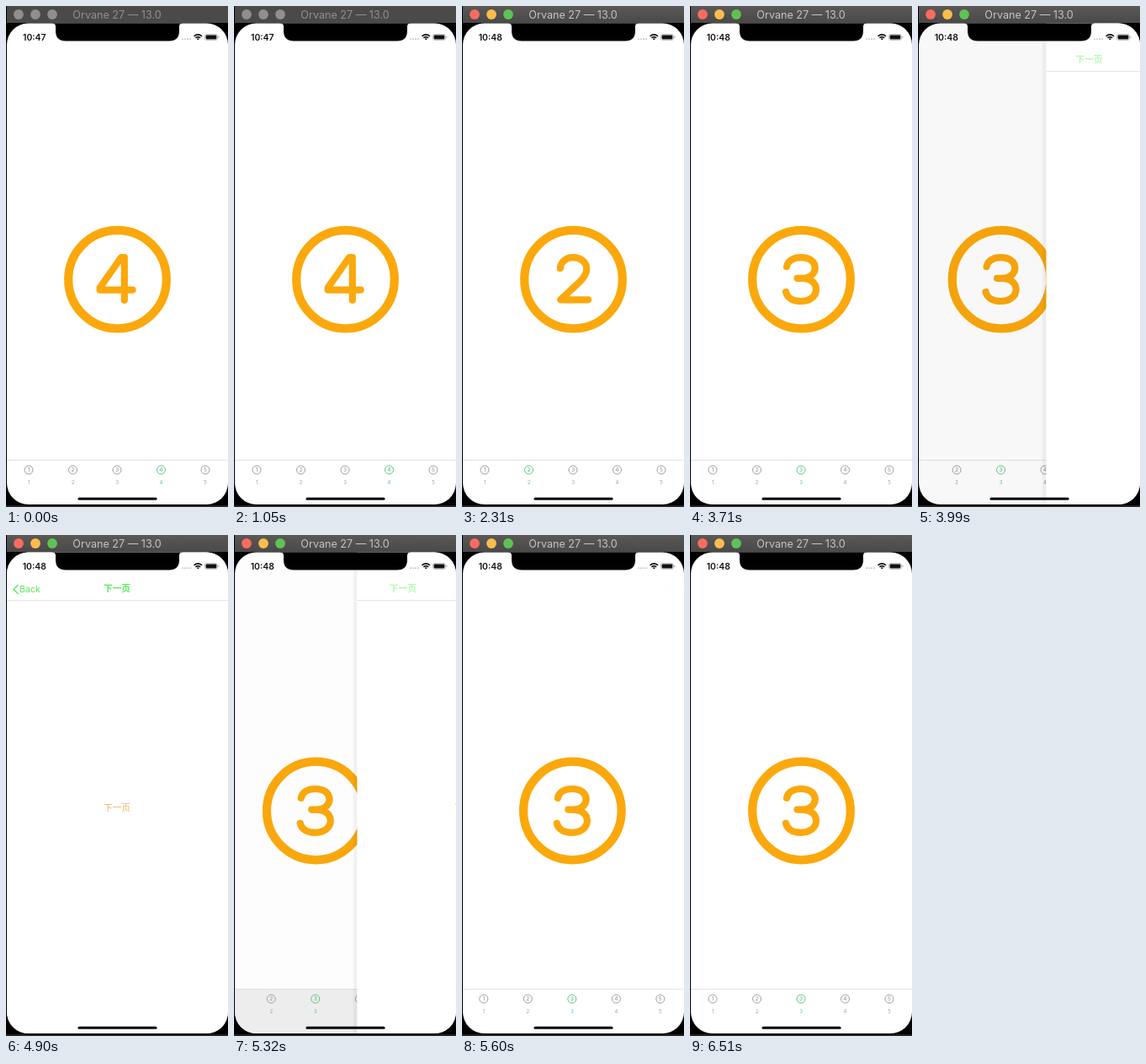
Animation of 264 by 594 pixels, one loop 6.58 s. Source, as an HTML page:

```html
<!DOCTYPE html>
<html lang="en">
<head>
<meta charset="utf-8">
<title>Tab demo</title>
<style>
html, body { margin: 0; width: 100%; height: 100%; overflow: hidden; background: #000; }
svg { display: block; width: 100vw; height: 100vh; }
text { font-family: Inter, Roboto, "Liberation Sans", sans-serif; }
.cjk { font-family: "Noto Sans CJK SC", "Noto Sans CJK", sans-serif; font-size: 10.7px; text-anchor: middle; }
.mid { text-anchor: middle; }
.line { fill: none; stroke-linecap: round; stroke-linejoin: round; }
</style>
</head>
<body>
<svg viewBox="0 0 264 594" preserveAspectRatio="none">
  <defs>
    <linearGradient id="barOn" x2="0" y2="1">
      <stop offset="0" stop-color="#5b5858"/><stop offset="1" stop-color="#4b4848"/>
    </linearGradient>
    <linearGradient id="shade">
      <stop offset="0" stop-color="#000" stop-opacity="0.03"/><stop offset="1" stop-color="#000" stop-opacity="0.06"/>
    </linearGradient>
    <clipPath id="screen"><rect x="1" y="20.5" width="263" height="570.5" rx="25.5"/></clipPath>
  </defs>

  <rect width="264" height="594" fill="#000"/>
  <rect y="592" width="264" height="2" fill="#252323"/>
  <rect id="bar" x="1" width="263" height="20"/>
  <g id="lights"></g>
  <text id="title" class="mid" x="132" y="14.8" font-size="12.6">Orvane 27 — 13.0</text>

  <g clip-path="url(#screen)">
    <rect y="20" width="264" height="572" fill="#fff"/>
    <g id="home">
      <g id="badge" class="line" stroke="#fba80c">
        <circle cx="132.5" cy="324.2" r="58.3" stroke-width="10.2"/>
        <path id="digit" stroke-width="8.2"/>
      </g>
      <rect id="tabBack" y="538" width="264" height="54" fill="#efefef"/>
      <rect y="538" width="264" height="1" fill="#e2e2e2"/>
      <g id="tabs"></g>
    </g>
    <rect id="dim" y="20" width="264" height="572" fill="#000"/>
    <g id="page">
      <rect id="edge" x="-5" y="42" width="5" height="550" fill="url(#shade)"/>
      <rect y="20" width="264" height="572" fill="#fff"/>
      <rect y="77" width="264" height="1" fill="#e4e4e4"/>
      <text class="cjk" x="132" y="327.4" fill="#f1b45c">下一页</text>
    </g>
    <g id="back" fill="#57e957">
      <path class="line" d="M14.2 59.5L8.9 64.5L14.2 69.5" stroke="#57e957" stroke-width="1.3"/>
      <text x="16" y="68.2" font-size="10.6">Back</text>
    </g>
    <text id="heading" class="cjk" x="132" y="67.2" font-weight="700" fill="#57f057">下一页</text>

    <path d="M55 20H210V20.5Q206 20.5 206 24.5V29.5Q206 41.4 194 41.4H71Q59 41.4 59 29.5V24.5Q59 20.5 55 20.5Z"/>
    <text id="clock" class="mid" x="33.8" y="40.6" font-size="10.4" font-weight="600" fill="#111"></text>
    <g fill="#c4c4c4">
      <circle cx="210" cy="39.3" r="1"/><circle cx="213" cy="39.3" r="1"/>
      <circle cx="216" cy="39.3" r="1"/><circle cx="219" cy="39.3" r="1"/>
    </g>
    <g class="line" stroke="#111" stroke-width="1.6" style="stroke-linecap:butt">
      <path d="M223.5 36Q228.3 31.6 233.1 36"/>
      <path d="M225.4 38Q228.3 35.3 231.2 38"/>
    </g>
    <path d="M226.8 38.9Q228.3 37.7 229.8 38.9L228.3 40.5Z" fill="#111"/>
    <rect x="236.5" y="33.5" width="15" height="7" rx="2" fill="none" stroke="#aaa" stroke-width="0.7"/>
    <rect x="237.6" y="34.5" width="12.8" height="5" rx="1.1" fill="#111"/>
    <rect x="252.4" y="35.8" width="1" height="2.5" rx="0.5" fill="#aaa"/>
    <rect x="85.5" y="582.8" width="94" height="3" rx="1.5" fill="#000"/>
  </g>
</svg>
<script>
const LOOP = 6580, STEP = 70, WIDTH = 264;
const ACTIVE = 1540, CLOCK = 1890, PUSH = 3897, PRESS = 4900, POP = 5200;
const SPEED = 0.0155;
const TABS = [[0, 4], [1610, 2], [2520, 3]];
const DIGITS = {
  2: "M116.8 311C117.4 303 124 298.2 132 298.2C141.6 298.2 148.2 304 148.2 312C148.2 318 145 322 140 327L117.2 348.3H150",
  3: "M115 309C116.5 302 123 298.2 132 298.2C142 298.2 148.8 303 148.8 310.5C148.8 318 142 322.8 133 322.8H127.5" +
     "M133 322.8C143 322.8 150 328 150 336C150 344.5 142 350 132 350C122.5 350 115.5 346 114 339",
  4: "M140.8 348.8V298H137L111.6 334.2V336.6H150.6"
};
const LIGHTS = ["#f96b5f", "#fabd4d", "#5fc255"];

const $ = id => document.getElementById(id);
const clamp = v => Math.max(0, Math.min(1, v));
const set = (id, attrs) => {
  for (const key in attrs) $(id).setAttribute(key, attrs[key]);
};
const shift = (id, x, y = 0) => set(id, { transform: `translate(${x} ${y})` });

$("lights").innerHTML = LIGHTS.map((c, i) => `<circle cx="${15 + 20 * i}" cy="10" r="5.9"/>`).join("");
$("tabs").innerHTML = [1, 2, 3, 4, 5].map(n => {
  const x = 27 + 52.5 * (n - 1);
  return `<g class="mid"><circle cx="${x}" cy="550" r="5" fill="none" stroke="currentColor" stroke-width="1"/>
    <text x="${x}" y="552.4" font-size="6.6" font-weight="500" fill="currentColor">${n}</text>
    <text x="${x}" y="567" font-size="6" fill="currentColor">${n}</text></g>`;
}).join("");

// Critically damped spring from 0 to 1
function spring(ms) {
  const k = Math.max(0, ms) * SPEED;
  return 1 - (1 + k) * Math.exp(-k);
}

function draw(t) {
  const active = t >= ACTIVE, popping = t >= POP;
  set("bar", { fill: active ? "url(#barOn)" : "#4c4949" });
  set("title", { fill: active ? "#c6c3c3" : "#918e8e" });
  [...$("lights").children].forEach((dot, i) => dot.setAttribute("fill", active ? LIGHTS[i] : "#918e8d"));
  $("clock").textContent = t >= CLOCK ? "10:48" : "10:47";

  const tab = TABS.filter(([at]) => t >= at).pop()[1];
  set("digit", { d: DIGITS[tab] });
  [...$("tabs").children].forEach((el, i) => {
    el.style.color = i + 1 === tab ? "#62c685" : "#a0a0a0";
  });

  const shown = popping ? 1 - spring(t - POP) : spring(t - PUSH);
  const x = WIDTH * (1 - shown);
  shift("home", -0.3 * WIDTH * shown);
  shift("badge", 0, popping ? 2.8 : 0);
  shift("page", x);
  shift("back", 0.2 * x);
  shift("heading", 0.47 * x);
  set("dim", { opacity: (popping ? 0.015 : 0.065) * shown });
  set("tabBack", { opacity: popping ? clamp(shown * 2.2) : 0 });
  set("edge", { opacity: clamp(4 * shown * (1 - shown)) });
  set("heading", { opacity: shown });
  const press = 1 - 0.7 * clamp((t - PRESS) / 210);
  set("back", { opacity: clamp(2 * shown - 1) * press });
  $("page").style.display = shown > 0.02 ? "" : "none";
}

const start = performance.now();
function tick() {
  const t = (performance.now() - start) % LOOP;
  draw(Math.floor(t / STEP) * STEP);
  requestAnimationFrame(tick);
}
tick();
</script>
</body>
</html>
```
